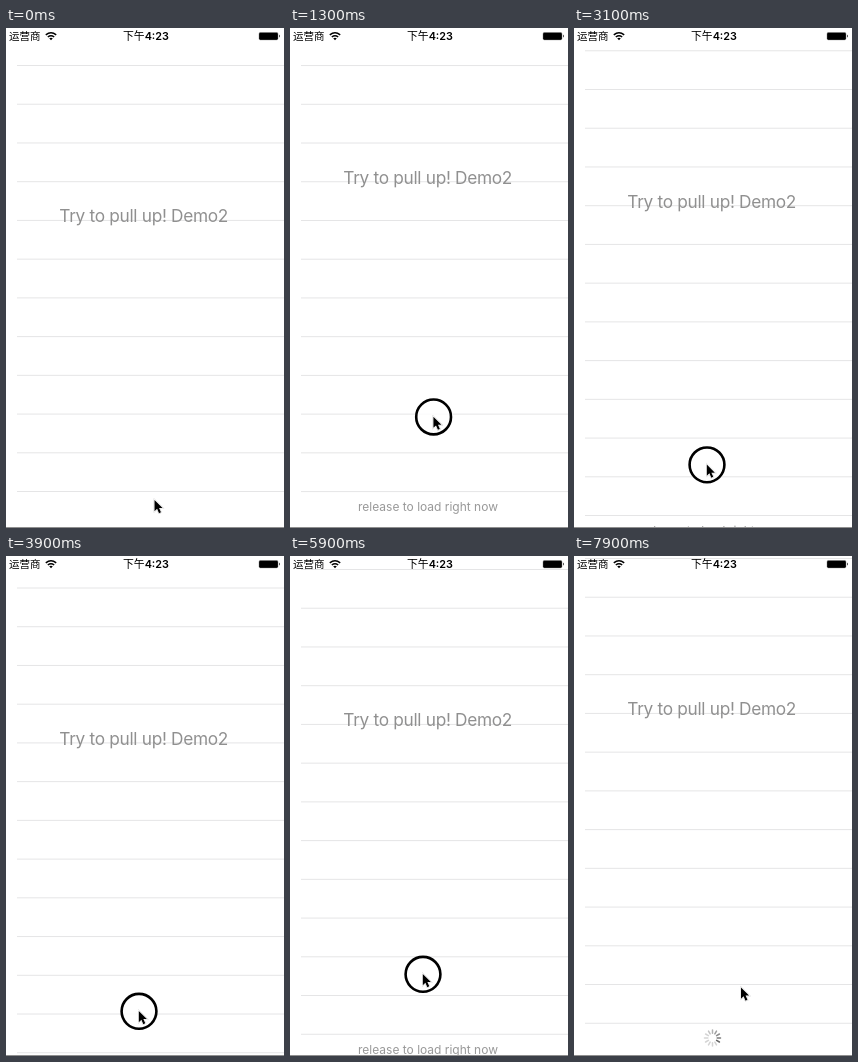
Recreate the animation shown at these times as an HTML page. Size 278x500 px, loop 8 s.

```html
<!DOCTYPE html>
<html lang="zh">
<head>
<meta charset="utf-8">
<title>Pull up to load</title>
<style>
  html, body { margin: 0; width: 100%; height: 100%; overflow: hidden; background: #fff; }
  svg { display: block; width: 278px; height: 500px; }
  text { text-anchor: middle; font-family: Inter, "Open Sans", sans-serif; }
  .title { font-size: 17.3px; letter-spacing: -.32px; fill: #909090; }
  .hint { font-size: 12px; fill: #999; }
  .bar { font: 10.5px "Noto Sans CJK SC", "Noto Sans CJK", sans-serif; text-anchor: start; }
  .clock { font: 600 10.8px Inter, "Noto Sans CJK SC", "Noto Sans CJK", sans-serif; }
  .clock tspan { font-weight: 500; }
</style>
</head>
<body>
<svg viewBox="0 0 278 500">
  <rect width="278" height="500" fill="#fff"/>
  <path id="rows" stroke="#e5e5e6" fill="none"/>
  <g id="content">
    <text class="title" x="137.7" y="194.4">Try to pull up! Demo2</text>
    <text class="hint" id="hint" x="138" y="521.5">release to load right now</text>
    <g id="spinner" transform="translate(138.5 517)" stroke="#555" stroke-width="1.5" stroke-linecap="round"></g>
  </g>
  <text class="bar" x="3" y="12">运营商</text>
  <g fill="none" stroke="#000" stroke-width="1.5">
    <path d="M39.8 6.9Q45 2.6 50.2 6.9M41.8 9Q45 6.4 48.2 9"/>
    <path d="M43.2 10.3Q45 9 46.8 10.3L45 12.2Z" fill="#000" stroke="none"/>
  </g>
  <text class="clock" x="140" y="12"><tspan>下午</tspan>4:23</text>
  <rect x="253" y="4.5" width="19" height="7.4" rx="1.4" stroke="#777" stroke-width=".4"/>
  <path d="M273 6.6Q274.8 8.2 273 9.8Z"/>
  <path d="M0 499.5H278" stroke="#8f8f8f"/>
  <g id="pointer">
    <circle id="ring" r="17.4" cx=".2" cy=".3" fill="#fff" fill-opacity=".85" stroke="#000" stroke-width="2.6"/>
    <path d="M0 0V12.4L2.9 9.8L5 14.6L7.2 13.7L5.1 9H9Z" transform="scale(.9)"
      stroke="#fff" stroke-width="1.6" paint-order="stroke"
      style="filter: drop-shadow(0 .8px .8px #0006)"/>
  </g>
</svg>
<script>
const LOOP = 8000, STEP = 200, ROW = 38.73;
const PRESS = 100, RELEASE = 7100;
const $ = id => document.getElementById(id);

// progress of a smooth move between two times
const ease = (t, from, to) =>
  (1 - Math.cos(Math.PI * Math.min(1, Math.max(0, (t - from) / (to - from))))) / 2;

// scroll distance: pull up, let down, pull up again, settle on the spinner
const pull = t => 42.5 * ease(t, 0, 1613) - 37 * ease(t, 2070, 3614)
  + 18.5 * ease(t, 4100, 5300) + 11 * ease(t, 6900, 7500);

const pointerX = t => 148.5 - 8 * ease(t, 300, 2000) - 7.7 * ease(t, 2200, 3100)
  + 34.2 * ease(t, RELEASE, 7900);

function pointerY(t) {
  if (t < PRESS) return 472;
  const held = Math.min(t, RELEASE - STEP);
  return 466 - 2 * pull(held) + 13.5 * ease(t, RELEASE, 7900);
}

const spokes = Array.from({ length: 12 }, (_, i) => {
  const line = document.createElementNS("http://www.w3.org/2000/svg", "path");
  line.setAttribute("d", "M0 -4.7V-8");
  line.setAttribute("transform", `rotate(${i * 30})`);
  return $("spinner").appendChild(line);
});

function draw(time) {
  // the screen refreshes every 200 ms, first at 100 ms
  const t = Math.max(0, Math.floor((time - PRESS) / STEP) * STEP + PRESS);
  const offset = pull(t);
  const loading = t >= RELEASE;
  const dragging = t >= PRESS && !loading;

  let d = "";
  for (let i = 0; i < 14; i++) d += `M11 ${37.5 + i * ROW - offset}H278`;
  $("rows").setAttribute("d", d);
  $("content").setAttribute("transform", `translate(0 ${-offset})`);

  $("hint").style.display = loading ? "none" : "";
  $("spinner").style.display = loading ? "" : "none";
  const head = Math.floor(t * 12 / 1000) + 6;
  spokes.forEach((spoke, i) => {
    const age = (head - i + 120) % 12;
    spoke.setAttribute("opacity", Math.max(.25, .9 - age * .11));
  });

  $("pointer").setAttribute("transform", `translate(${pointerX(t)} ${pointerY(t)})`);
  $("ring").style.display = dragging ? "" : "none";
}

const start = performance.now();
function tick() {
  draw((performance.now() - start) % LOOP);
  requestAnimationFrame(tick);
}
draw(0);
requestAnimationFrame(tick);
</script>
</body>
</html>
```
